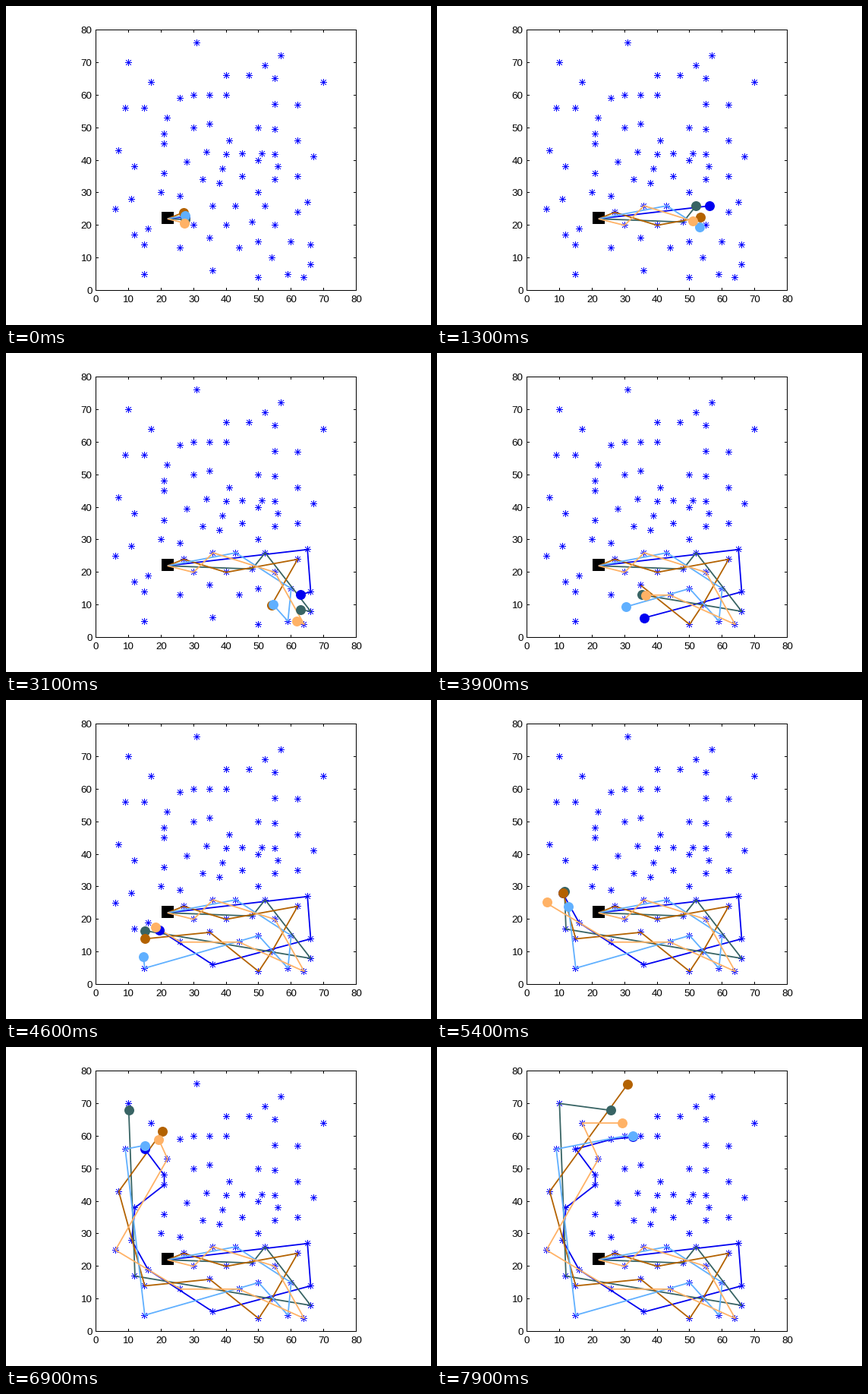
Recreate the animation shown at these times as a matplotlib script. Size 560 by 420 pixels, loop 8000 ms.

```python
import matplotlib.pyplot as plt
import numpy as np
from matplotlib.animation import FuncAnimation
from matplotlib.collections import LineCollection
from matplotlib.patches import Rectangle

W, H, DPI = 560, 420, 100
PT = 72 / DPI
LEFT, RIGHT, TOP, BOTTOM = 118.5, 461.5, 31.5, 374.5
SCALE = (RIGHT - LEFT) / 80
FRAMES, INTERVAL = 80, 100
DEPOT = (22, 22)
SERVICE = 1.0

# Colour and stops of each vehicle; later ones lie on top.
ROUTES = [
    ("#0000f0", [(65, 27), (66, 14), (36, 6), (16, 19), (11, 28), (12, 38),
                 (21, 45), (21, 48), (15, 56), (26, 59), (35, 60)]),
    ("#386464", [(48, 21), (52, 26), (66, 8), (12, 17), (10, 70), (40, 66)]),
    ("#b36200", [(27, 24), (40, 20), (62, 24), (54, 10), (50, 4), (35, 16),
                 (15, 14), (7, 43), (31, 76)]),
    ("#60b0ff", [(43, 26), (60, 15), (59, 5), (50, 15), (15, 5), (9, 56),
                 (30, 60), (40, 60)]),
    ("#ffb266", [(30, 20), (36, 26), (55, 20), (64, 4), (44, 13), (26, 13),
                 (6, 25), (22, 53), (17, 64), (70, 64)]),
]
# Waiting customers stand in evenly spaced rows: first, last, count.
ROWS = [
    ((20, 30), (21, 36), 2), ((26, 29), (30, 50), 3), ((33, 34), (35, 51), 3),
    ((38, 33), (41, 46), 4), ((45, 35), (67, 41), 3), ((45, 42), (51, 42), 2),
    ((50, 30), (50, 50), 3), ((55, 34), (55, 65), 5), ((62, 35), (62, 57), 3),
    ((47, 66), (57, 72), 3),
]


def to_px(points):
    p = np.asarray(points, float)
    return np.stack([LEFT + SCALE * p[..., 0], BOTTOM - SCALE * p[..., 1]], -1)


class Vehicle:
    """Drives at unit speed and waits SERVICE at every stop."""

    def __init__(self, ax, color, stops, z):
        self.times, self.points = [0.0], [DEPOT]
        for stop in stops:
            arrive = self.times[-1] + np.hypot(*np.subtract(stop, self.points[-1]))
            self.times += [arrive, arrive + SERVICE]
            self.points += [stop, stop]
        self.times = np.array(self.times)
        self.points = to_px(self.points)
        self.trail, = ax.plot([], [], color=color, lw=1.8 * PT, zorder=4 + z / 10,
                              solid_joinstyle="round", solid_capstyle="butt")
        self.dot, = ax.plot([], [], "o", color=color, ms=13 * PT, mew=0,
                            zorder=5 + z / 10)

    def show(self, t):
        pos = [np.interp(t, self.times, self.points[:, k]) for k in (0, 1)]
        path = np.vstack([self.points[self.times < t], pos])
        self.trail.set_data(path[:, 0], path[:, 1])
        self.dot.set_data([pos[0]], [pos[1]])
        # The dot vanishes while another vehicle acts during its service.
        arrive, leave = self.times[1::2], self.times[2::2]
        self.dot.set_visible(not np.any((arrive + 1e-6 < t) & (t < leave - 1e-6)))
        return [self.trail, self.dot]


def hairlines(ax, segs, color, z):
    ax.add_collection(LineCollection(segs, colors=color, linewidths=PT, zorder=z,
                                     capstyle="projecting", snap=False))


def draw_axes(ax):
    segs = [[(LEFT, TOP), (RIGHT, TOP)], [(LEFT, BOTTOM), (RIGHT, BOTTOM)],
            [(LEFT, TOP), (LEFT, BOTTOM)], [(RIGHT, TOP), (RIGHT, BOTTOM)]]
    font = dict(family="Liberation Sans", size=13.4 * PT, va="baseline")
    for v in range(0, 81, 10):
        x, y = np.floor(to_px((v, v))) + 0.5
        segs += [[(x, TOP), (x, TOP + 3)], [(x, BOTTOM), (x, BOTTOM - 3)],
                 [(LEFT, y), (LEFT + 3, y)], [(RIGHT, y), (RIGHT - 3, y)]]
        ax.text(x, 390, str(v), ha="center", **font)
        ax.text(113.5, y + 4.9, str(v), ha="right", **font)
    hairlines(ax, segs, "black", 2)


def draw_stars(ax, places):
    segs = []
    for x, y in np.floor(to_px(places)) + 0.5:
        for dx, dy in [(4, 0), (0, 4), (3, 3), (3, -3)]:
            segs.append([(x - dx, y - dy), (x + dx, y + dy)])
    hairlines(ax, segs, "#0000ff", 1)


fig = plt.figure(figsize=(W / DPI, H / DPI), dpi=DPI, facecolor="white")
ax = fig.add_axes([0, 0, 1, 1])
ax.set(xlim=(0, W), ylim=(H, 0))
ax.axis("off")

draw_axes(ax)
draw_stars(ax, [stop for _, stops in ROUTES for stop in stops])
draw_stars(ax, np.vstack([np.linspace(*row) for row in ROWS]))
ax.add_patch(Rectangle((205, 271), 16, 16, fc="black", lw=0, zorder=3))

fleet = [Vehicle(ax, color, stops, z) for z, (color, stops) in enumerate(ROUTES)]
# Each step of the clock is the next arrival or departure of any vehicle.
events = np.sort(np.concatenate([v.times[1:] for v in fleet]))[:FRAMES]


def update(i):
    return [artist for v in fleet for artist in v.show(events[i])]


anim = FuncAnimation(fig, update, frames=FRAMES, interval=INTERVAL,
                     repeat=True, repeat_delay=0, blit=False)
plt.show()
```
